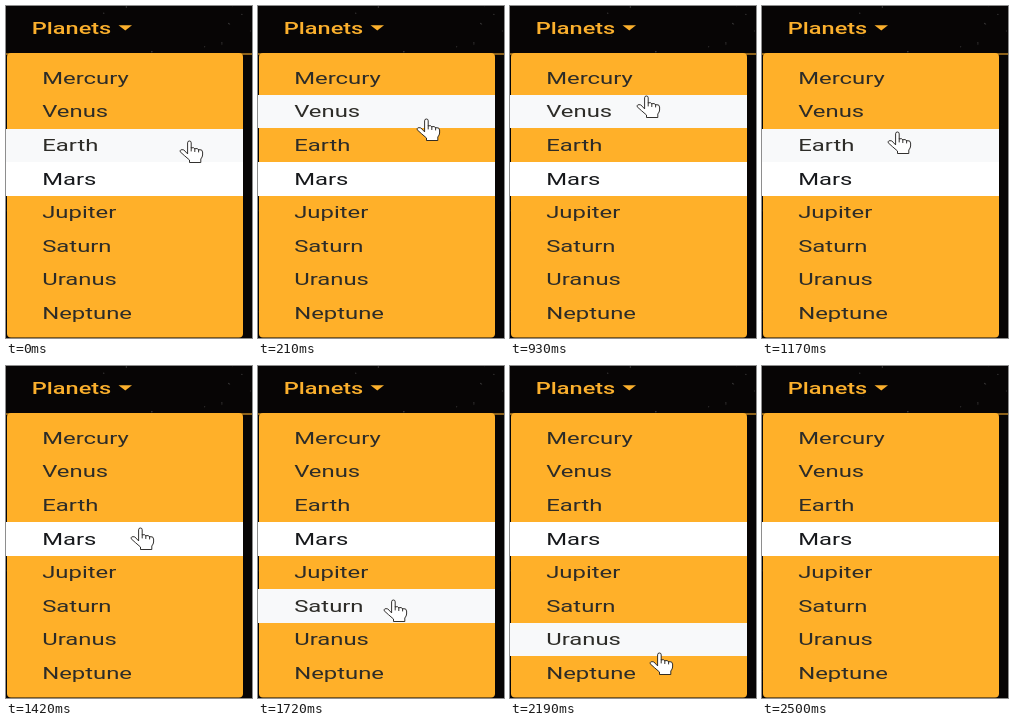
An HTML page for the animation above (2820 ms loop, 246 px wide and 332 px high).

```html
<!DOCTYPE html>
<html lang="en">
<head>
<meta charset="utf-8">
<title>Planets menu</title>
<style>
html, body { margin: 0; width: 100%; height: 100%; overflow: hidden; background: #070505; }
svg { display: block; width: 100%; height: 100%; }
text { font: 16.8px Roboto, sans-serif; }
.title { font-weight: 500; }
</style>
</head>
<body>
<svg viewBox="0 0 246 332">
  <rect width="246" height="332" fill="#070505"/>
  <g id="dust" fill="#fff"></g>
  <rect y="47.4" width="246" height="1.2" fill="#e5a02a"/>
  <g fill="#fbb02d">
    <text class="title" transform="translate(25.8 27.6) scale(1.4 1)">Planets</text>
    <path d="M112.5 19.2H126L119.3 24.6Z"/>
  </g>
  <rect x="1" y="47" width="236" height="284.5" rx="4" fill="#ffb029"/>
  <g id="rows"></g>
  <g id="hand" stroke="#1c1a18" stroke-width=".9" stroke-linejoin="round" stroke-linecap="round">
    <path fill="#fff" d="M8.6 13.5V2.8Q8.6 1 10.4 1T12.2 2.8V8Q14.6 6.8 15.8 8.8Q18.4 7.8 19.6 9.7Q23.5 9 23.6 12V15Q23.5 17 21.8 19V22.5H10.5V20L5.4 15.6L1.2 11.8Q.6 9 4.4 9.8Z"/>
    <path fill="none" d="M12.2 8V11M15.8 8.8V11.6M19.6 9.7V12"/>
  </g>
</svg>
<script>
const LOOP = 2820, FIRST = 130, STEP = 79, LAST = 29;
const TOP = 55.4, PITCH = 33.55, ACTIVE = 3;
const names = ["Mercury", "Venus", "Earth", "Mars", "Jupiter", "Saturn", "Uranus", "Neptune"];

// Pointer key points: step, x, y
const path = [[-1, 173, 134], [4, 135, 79], [7, 129, 62], [8, 129, 62], [10, 126, 89],
  [16, 124, 161], [20, 125, 233], [23, 131, 263], [LAST, 146, 308]];

const $ = id => document.getElementById(id);

function add(parent, tag, attrs, content = "") {
  const el = document.createElementNS("http://www.w3.org/2000/svg", tag);
  for (const key in attrs) el.setAttribute(key, attrs[key]);
  el.textContent = content;
  return parent.appendChild(el);
}

let seed = 7;
const random = () => (seed = seed * 16807 % 2147483647) / 2147483647;

for (let i = 0; i < 120; i++)
  add($("dust"), "circle", { cx: random() * 246, cy: random() * 332, r: .7, opacity: .3 * random() });

const rows = names.map((name, i) => {
  const top = TOP + i * PITCH, y = Math.round(top);
  const height = Math.round(top + PITCH) - y;
  const bar = add($("rows"), "rect", { y, width: 237, height });
  add($("rows"), "text", {
    transform: `translate(36.2 ${top + 22.5}) scale(1.42 1)`,
    fill: i === ACTIVE ? "#16181b" : "#2d2c28"
  }, name);
  return bar;
});

function pointerAt(step) {
  const i = Math.max(1, path.findIndex(p => p[0] >= step));
  const [t0, x0, y0] = path[i - 1], [t1, x1, y1] = path[i];
  const k = (step - t0) / (t1 - t0);
  return [x0 + (x1 - x0) * k, y0 + (y1 - y0) * k].map(Math.round);
}

function draw(time) {
  const step = Math.max(-1, Math.floor((time % LOOP - FIRST) / STEP));
  const visible = step <= LAST;
  const [x, y] = pointerAt(Math.min(step, LAST));
  const over = visible ? Math.floor((y + 2 - TOP) / PITCH) : -1;
  rows.forEach((bar, i) => {
    // The last entry has no hover state
    const hover = i === over && i < names.length - 1;
    bar.setAttribute("fill", i === ACTIVE ? "#fff" : hover ? "#f8f9fa" : "none");
  });
  $("hand").setAttribute("transform", `translate(${x} ${y})`);
  $("hand").setAttribute("visibility", visible ? "visible" : "hidden");
}

const start = performance.now();
function tick() {
  draw(performance.now() - start);
  requestAnimationFrame(tick);
}
tick();
</script>
</body>
</html>
```
